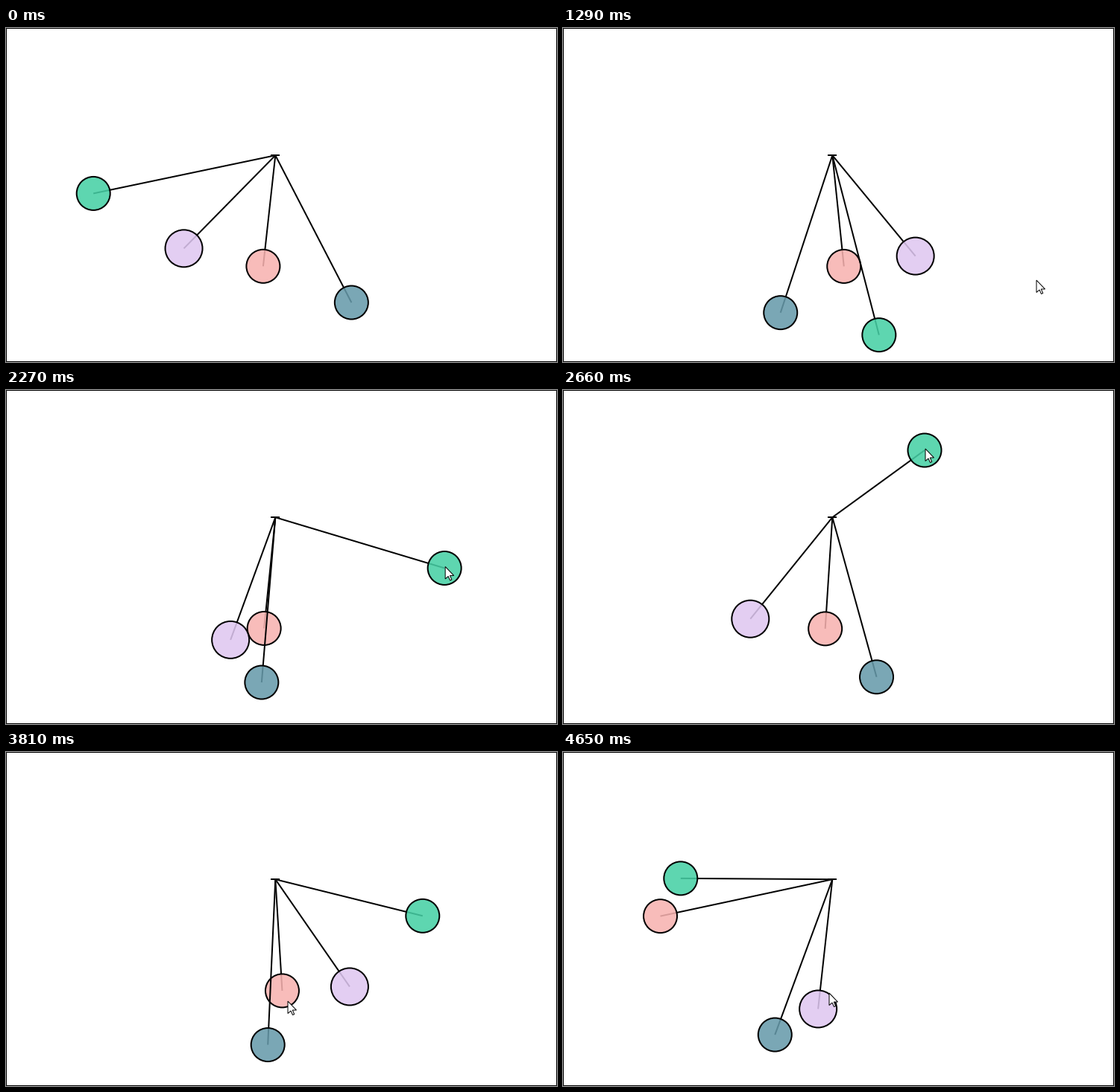
Write a matplotlib script that moves like this. It is 739 px wide and 449 px high and loops after 4730 ms.

```python
import math
from collections import namedtuple

import matplotlib.pyplot as plt
from matplotlib.animation import FuncAnimation
from matplotlib.patches import Circle, Polygon, Rectangle

W, H, DPI = 739, 449, 100
PX = 72 / DPI                      # one pixel in points
FRAMES, INTERVAL = 473, 10
PIVOT_X, PIVOT_Y = 361.3, 171.2
GRAVITY = 1031                     # px / s^2
DECAY = 0.05                       # loss of amplitude per second
FILL_ALPHA = 0.87

# Angles in degrees from straight down, rate in rad/s;
# a dragged bob also has the seconds of its grab and release.
Bob = namedtuple("Bob", "length radius fill swing rate phase grab release",
                 defaults=(math.inf, math.inf))
BOBS = [
    Bob(150, 22.5, "#f8b2b0", -6.6, 2.728, -0.093, 3.9, 4.305),
    Bob(175.3, 25, "#dfc7f1", -44.5, 2.493, -0.418),
    Bob(222.6, 22.5, "#669aaa", 28, 2.238, -0.56),
    Bob(249.4, 22.5, "#46d0a5", -83, 1.835, -0.617, 2.2, 3.2),
]

# Pointer stops: seconds, x, y
STOPS = [(1.29, 635, 339), (1.81, 587, 297), (2.2, 596, 248), (2.66, 486, 79),
         (3.2, 531, 55.4), (3.81, 378, 335), (4.305, 126.6, 157.3),
         (4.65, 357, 324)]
POINTER_SHOWN = 1.21
ARROW = [(0, 0), (0, 16.5), (4, 13), (6.5, 18.5), (8.7, 17.5), (6.3, 12),
         (11.5, 12)]


def pointer(t):
    """Glide from stop to stop, easing in and out of each one."""
    t = min(max(t, STOPS[0][0]), STOPS[-1][0])
    for (t0, x0, y0), (t1, x1, y1) in zip(STOPS, STOPS[1:]):
        if t <= t1:
            u = (t - t0) / (t1 - t0)
            u = u * u * (3 - 2 * u)
            return x0 + (x1 - x0) * u, y0 + (y1 - y0) * u


def held(t):
    x, y = pointer(t)
    return x - 1, y + 2


def on_circle(length, angle):
    return (PIVOT_X + length * math.sin(angle),
            PIVOT_Y + length * math.cos(angle))


def swinging(bob, t):
    # The motion spins up gently over the first half second.
    clock = t + 0.149 * math.exp(-t / 0.37)
    angle = bob.swing * math.exp(-DECAY * t) * math.cos(bob.rate * clock + bob.phase)
    return on_circle(bob.length, math.radians(angle))


def falling(bob, t, dt=0.0025):
    """Pendulum let go at rest from where the pointer held it."""
    x, y = held(bob.release)
    length = math.hypot(x - PIVOT_X, y - PIVOT_Y)
    angle = math.atan2(x - PIVOT_X, y - PIVOT_Y)
    speed = 0
    for _ in range(round((t - bob.release) / dt)):
        speed -= GRAVITY / length * math.sin(angle) * dt
        angle += speed * dt
    return on_circle(length, angle)


def position(bob, t):
    if t < bob.grab:
        return swinging(bob, t)
    if t < bob.release:
        return held(t)
    return falling(bob, t)


fig = plt.figure(figsize=(W / DPI, H / DPI), dpi=DPI, facecolor="white")
ax = fig.add_axes([0, 0, 1, 1])
ax.set_xlim(0, W)
ax.set_ylim(H, 0)
ax.axis("off")

ax.add_patch(Rectangle((0.5, 0.5), W - 1, H - 1, fill=False, edgecolor="black",
                       linewidth=PX, snap=False, clip_on=False, zorder=20))


def rod(xs, ys, zorder):
    line, = ax.plot(xs, ys, color="black", linewidth=2 * PX, snap=False,
                    solid_capstyle="butt", zorder=zorder)
    return line


rod([355, 367], [171, 171], 1)
rods, discs = [], []
for i, bob in enumerate(BOBS):
    rods.append(rod([], [], 2 + 2 * i))
    discs.append(ax.add_patch(Circle((0, 0), bob.radius, linewidth=2 * PX,
                                     facecolor=(bob.fill, FILL_ALPHA),
                                     edgecolor="black", zorder=3 + 2 * i)))

arrow = ax.add_patch(Polygon(ARROW, closed=True, facecolor="white",
                             edgecolor="black", linewidth=PX, zorder=15))


def draw(frame):
    t = frame * INTERVAL / 1000
    for bob, line, disc in zip(BOBS, rods, discs):
        x, y = position(bob, t)
        line.set_data([PIVOT_X, x], [PIVOT_Y, y])
        disc.center = x, y
    px, py = pointer(t)
    arrow.set_xy([(px + dx, py + dy) for dx, dy in ARROW])
    arrow.set_visible(t >= POINTER_SHOWN)
    return [*rods, *discs, arrow]


anim = FuncAnimation(fig, draw, frames=FRAMES, interval=INTERVAL,
                     repeat=True, repeat_delay=0)
plt.show()
```
